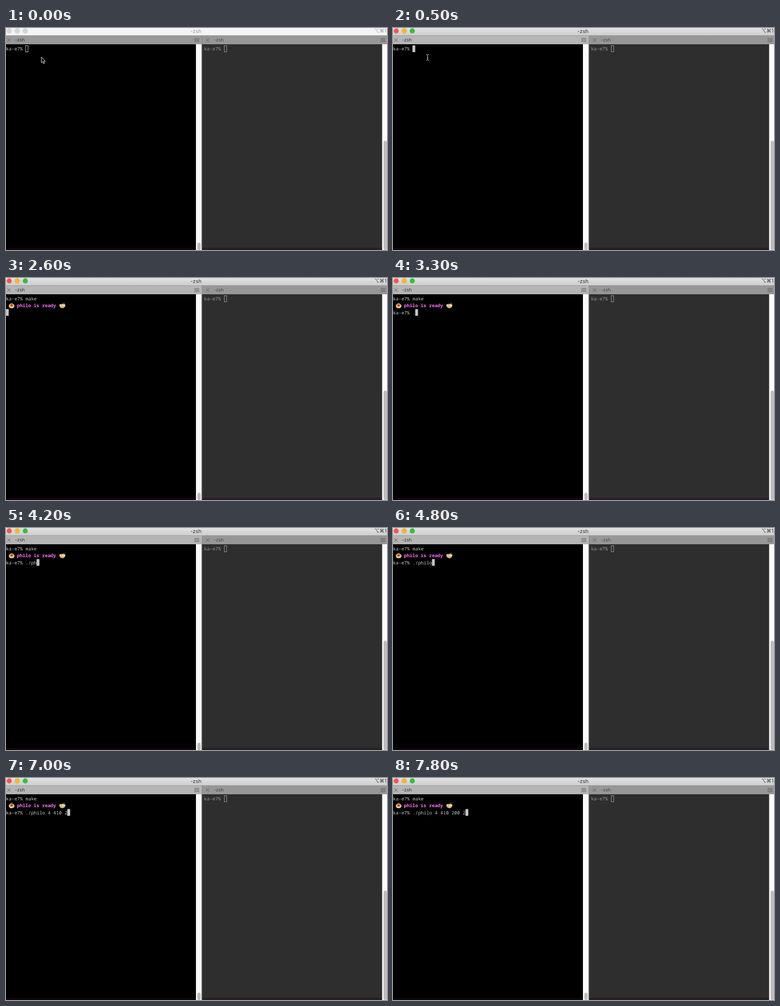
Write an HTML page that moves like this. It is 678 px wide and 396 px high and loops after 8 s.

```html
<!DOCTYPE html>
<html lang="en">
<head>
<meta charset="utf-8">
<title>Terminal</title>
<style>
  html, body { margin: 0; width: 100%; height: 100%; overflow: hidden; background: #000; }
  svg { display: block; width: 678px; height: 396px; }
  text { white-space: pre; text-rendering: geometricPrecision; }
  .mono { font: 8.28px "Noto Sans Mono", "DejaVu Sans Mono", monospace; fill: #c4c4c4; }
  .dim { fill: #989898; }
  .ready { font-weight: 700; fill: #ff70fa; }
  .ui { font-family: Inter, Roboto, sans-serif; fill: #303030; }
  .title { font-size: 9.4px; }
  .tab { font-size: 8.2px; }
  .icon { fill: none; stroke: #555; stroke-width: .9; }
  .lights circle { stroke: rgba(0, 0, 0, .12); stroke-width: .5; }
  .idle .lights circle { fill: #d6d6d6; }
  .idle .title { fill: #999; }
  .idle #bar { fill: #f4f4f4; }
  .idle #leftTab { fill: #999; }
</style>
</head>
<body>
<svg id="stage" class="idle" viewBox="0 0 678 396">
  <defs>
    <linearGradient id="metal" x2="0" y2="1">
      <stop stop-color="#e2e2e2"/><stop offset="1" stop-color="#cdcdcd"/>
    </linearGradient>
    <g id="tabIcons" class="icon">
      <path d="M2.2 18.5l6 6m0-6l-6 6"/>
    </g>
    <path id="menu" class="icon" d="M0 18.8h9m-9 2.7h9m-9 2.7h9"/>
  </defs>

  <rect id="bar" width="678" height="13.5" fill="url(#metal)"/>
  <g class="lights">
    <circle cx="5.7" cy="5.2" r="4.4" fill="#fc544e"/>
    <circle cx="20" cy="5.2" r="4.4" fill="#fdb529"/>
    <circle cx="34.3" cy="5.2" r="4.4" fill="#30c13e"/>
  </g>
  <text class="ui title" x="338" y="8.9" text-anchor="middle">-zsh</text>
  <text class="ui title" x="677" y="8.4" text-anchor="end" style="font-family: Inter, 'DejaVu Sans', sans-serif; font-size: 8.8px">⌥⌘1</text>

  <rect id="leftTab" y="13.3" width="349" height="15.7" fill="#b5b5b5"/>
  <rect x="349" y="13.3" width="329" height="15.7" fill="#979797"/>
  <path d="M0 13.5h678" stroke="#a2a2a2" stroke-width=".6"/>
  <path d="M349 13.3v16" stroke="#858585" stroke-width=".8"/>
  <use href="#tabIcons"/>
  <use href="#tabIcons" x="353.6"/>
  <use href="#menu" x="335"/>
  <use href="#menu" x="666.5"/>
  <text class="ui tab" x="16" y="24.4">-zsh</text>
  <text class="ui tab" x="370" y="24.4" fill-opacity=".8">-zsh</text>

  <rect y="29" width="338" height="367"/>
  <rect y="392" width="338" height="4" fill="#12040b"/>
  <rect x="338" y="29" width="10.5" height="367" fill="#fafafa"/>
  <rect x="340.5" y="383" width="6" height="13" rx="3" fill="#bebebe"/>
  <rect x="348.5" y="29" width="321" height="367" fill="#2e2e2e"/>
  <rect x="349" y="392" width="320" height="4" fill="#2a1e24"/>
  <path d="M348.9 29v367" stroke="#777" stroke-width=".8"/>
  <rect x="669.3" y="29" width="8.7" height="367" fill="#fafafa"/>
  <rect x="672" y="201" width="6" height="195" rx="3" fill="#bdbdbd"/>

  <text class="mono dim" x="352.5" y="40.1">ka-e7%</text>
  <rect x="388.5" y="31.5" width="4.2" height="11" fill="none" stroke="#989898" stroke-width=".9"/>

  <text id="line1" class="mono" y="40.1"></text>
  <g id="output">
    <text class="mono ready" x="19.6" y="52.3">philo is ready</text>
    <ellipse cx="10" cy="49.8" rx="5" ry="4" fill="#eee3d2"/>
    <ellipse cx="10" cy="49.3" rx="3.8" ry="2.8" fill="#e5a13c"/>
    <ellipse cx="10" cy="48.6" rx="2.1" ry="1.6" fill="#b52b16"/>
    <path d="M8 45.3l4-.6" stroke="#7d9a45" stroke-width=".8"/>
    <path d="M95 48.2h10.6c0 3.5-2.2 5.6-5.3 5.6s-5.3-2.1-5.3-5.6z" fill="#d9b58c"/>
    <ellipse cx="100.3" cy="48.2" rx="5.2" ry="1.9" fill="#f2dfae"/>
    <path d="M99 47.4l6-2.9m-5 2.2l4-2.6" stroke="#a9683a" stroke-width=".7"/>
    <path d="M97 48.4h3" stroke="#7f9a4a" stroke-width=".9"/>
  </g>
  <text id="line3" class="mono" y="64.5"></text>
  <rect id="caret" width="5" height="12" fill="#c6c6c6"/>
  <rect id="hollow" x="34.9" y="31.4" width="4.3" height="11.2" fill="none" stroke="#c6c6c6" stroke-width=".9"/>

  <path id="arrow" d="M63 51.8v10l2.3-2 1.6 3.8 1.7-.7-1.6-3.7h3z" stroke="#eee" stroke-width=".9"/>
  <path id="beam" d="M59 47.2q2.2 0 2.6 1.2q.4-1.2 2.6-1.2M61.6 48.4v8M59 57.6q2.2 0 2.6-1.2q.4 1.2 2.6 1.2M60.4 53.8h2.4" fill="none" stroke="#ddd" stroke-width=".9"/>
</svg>
<script>
  const LOOP = 8000, CELL = 4.968, ROW = 12.2;
  const PROMPT = "ka-e7% ";
  const MAKE = "make", RUN = "./philo 4 410 200 2";
  const makeKeys = [1600, 1700, 1800, 1900];
  const runKeys = [3300, 3500, 3800, 4200, 4400, 4600, 4800, 5000, 5300, 5800,
                   6000, 6600, 6800, 6900, 7000, 7200, 7400, 7600, 7800];
  const ACTIVE = 400, FOCUS = 500, ENTER = 2300, DONE = 2600, READY = 2700;

  const $ = id => document.getElementById(id);
  const show = (id, on) => $(id).style.visibility = on ? "visible" : "hidden";
  const typed = (text, keys, t) => PROMPT + text.slice(0, keys.filter(k => k <= t).length);

  function draw(t) {
    const first = typed(MAKE, makeKeys, t);
    const last = t < READY ? "" : typed(RUN, runKeys, t);
    const row = t < ENTER ? 0 : t < DONE ? 1 : 2;
    const col = [first.length, 0, last.length][row];

    $("stage").classList.toggle("idle", t < ACTIVE);
    $("line1").textContent = first;
    $("line3").textContent = last;
    $("caret").setAttribute("x", col * CELL - .2);
    $("caret").setAttribute("y", 31 + row * ROW);

    show("output", t >= DONE);
    show("hollow", t < FOCUS);
    show("caret", t >= FOCUS);
    show("arrow", t < FOCUS);
    show("beam", t >= FOCUS && t < makeKeys[0]);
  }

  const start = performance.now();
  function tick() {
    draw((performance.now() - start) % LOOP);
    requestAnimationFrame(tick);
  }
  tick();
</script>
</body>
</html>
```
